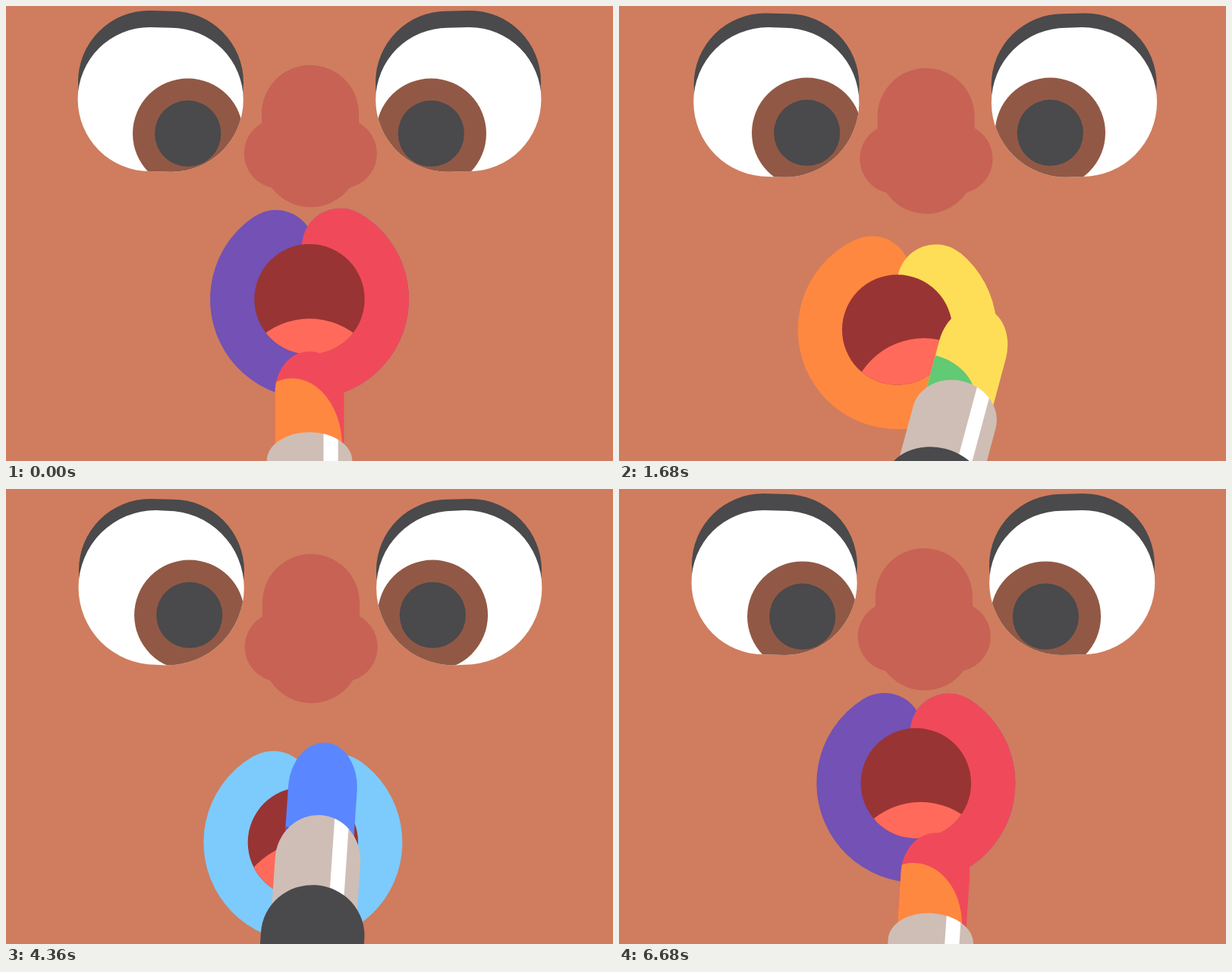
An HTML page with a canvas for the animation above (6720 ms loop, 800x600 px).

```html
<!DOCTYPE html>
<html>
<head>
<meta charset="utf-8">
<title>Rainbow lipstick</title>
<style>
html, body { margin: 0; width: 100%; height: 100%; overflow: hidden; background: #cf7d5e; }
canvas { display: block; }
</style>
</head>
<body>
<canvas id="stage" width="800" height="600"></canvas>
<script>
const ctx = document.getElementById('stage').getContext('2d');
const SKIN = '#cf7d5e', NOSE = '#c76254', DARK = '#4a494c', IRIS = '#915945';
const MOUTH = '#993434', TONGUE = '#ff6a5b', METAL = '#cfbeb6';
const PAINTS = ['#7351b5', '#f04a5a', '#ff8840', '#ffde57', '#62c975', '#7ccbfc', '#5a87ff'];
const TURN = 960, LOOP = TURN * PAINTS.length, TAU = Math.PI * 2, DEG = Math.PI / 180;
const { sin, cos, min, PI } = Math;

function fill(color, path) {
  ctx.fillStyle = color;
  ctx.fill(path);
}

function shape(draw) {
  const path = new Path2D();
  draw(path);
  return path;
}

const circle = (x, y, r) => shape(p => p.arc(x, y, r, 0, TAU));

// Runs a drawing inside its own saved state, optionally clipped.
function layer(draw, clip) {
  ctx.save();
  if (clip) ctx.clip(clip);
  draw();
  ctx.restore();
}

// Slightly tilted pill between two x limits.
const pill = (left, right, y, r) => shape(p => {
  p.arc(left + r, y - 0.4, r, PI / 2, PI * 1.5);
  p.arc(right - r, y + 0.4, r, -PI / 2, PI / 2);
  p.closePath();
});

// Upright column with an elliptic top.
const column = (y, rx, ry) => shape(p => {
  p.ellipse(0, y, rx, ry, 0, PI, TAU);
  p.lineTo(rx, 320);
  p.lineTo(-rx, 320);
  p.closePath();
});

// Pie slice; angles run clockwise from the top.
const slice = (from, to, r) => shape(p => {
  p.moveTo(0, 0);
  p.arc(0, 0, r, from - PI / 2, to - PI / 2);
  p.closePath();
});

function eye(s, c) {
  const dx = -3.64 * s, left = 94.6 + dx, right = 312.8 + dx;
  const r = (197 - 7 * c) / 2;
  const white = pill(left, right, 28.4 + r, r);
  const x = 239.7 - 8 * s, y = 167.2 + c;
  fill(DARK, pill(left + 0.4, right + 0.2, 103.9 - 3.6 * c, 94));
  fill('#fff', white);
  layer(() => fill(IRIS, circle(x, y, 72.7)), white);
  layer(() => fill(DARK, circle(x, y, 43.6)), white);
}

function nose(s, c) {
  const x = 401.3 - 3.64 * s, side = 201.5 - 7 * c;
  const bar = (width, x1, y1, x2, y2) => {
    ctx.lineWidth = width;
    ctx.beginPath();
    ctx.moveTo(x1, y1);
    ctx.lineTo(x2, y2);
    ctx.stroke();
  };
  ctx.strokeStyle = NOSE;
  ctx.lineCap = 'round';
  bar(128, x - 0.3, 146 - 4 * c, x + 0.3, 210 - 8.7 * c);
  bar(92, x - 41.5, side, x + 41.5, side);
}

function lips(s, c, x, y, front, oldColor, newColor) {
  const tilt = (-7.9 * s - 1.06 * c - 0.44) * DEG;
  const spread = 32 * DEG, edge = front - tilt;
  const lobe = side => circle(side * 80 * sin(spread), -80 * cos(spread), 50.8);
  const body = slice(spread, TAU - spread, 131);
  layer(() => {
    ctx.translate(x, y);
    ctx.rotate(tilt);
    for (const part of [body, lobe(-1), lobe(1)]) fill(oldColor, part);
    layer(() => {
      fill(newColor, body);
      fill(newColor, lobe(-1));
    }, slice(0, Math.max(0, min(edge, TAU - 0.001)), 200));
    layer(() => fill(newColor, lobe(1)), slice(-1, min(edge, PI), 200));
  });

  const hole = circle(x, y, 72.7);
  const s2 = 2 * s * c, c2 = c * c - s * s;
  const tx = 400 + 7 * s + 2.4 * s2 + 4.5 * (1 - c2);
  const ty = 537.8 - 27.5 * c + 1.8 * s;
  fill(MOUTH, hole);
  layer(() => fill(TONGUE, circle(tx, ty, 98)), hole);
}

function lipstick(c, stick, age, color, nextColor) {
  layer(() => {
    ctx.translate(stick.x, stick.y);
    ctx.rotate(stick.tilt);

    const bullet = column(stick.tip, 45.4, 57.5 - 3.5 * c);
    fill(color, bullet);
    layer(() => {
      ctx.translate(min(5, 0.085 * age - 23), -19);
      fill(nextColor, column(0, 66, 89.5 + 0.15 * age));
    }, bullet);

    const tube = column(0, 56.3, 49 - 11.5 * c);
    fill(METAL, tube);
    layer(() => {
      ctx.fillStyle = '#fff';
      ctx.fillRect(18.5, -80, 19.2, 400);
    }, tube);
    fill(DARK, column(99, 68.3, 56 - 11 * c));
  });
}

function draw(t) {
  const angle = t / TURN * TAU, s = sin(angle), c = cos(angle);
  const shifted = t + TURN / 2;
  const turn = Math.floor(shifted / TURN);
  const age = shifted % TURN - TURN / 2;
  const paint = i => PAINTS[(turn + i) % PAINTS.length];

  ctx.fillStyle = SKIN;
  ctx.fillRect(0, 0, 800, 600);
  eye(s, c);
  layer(() => {
    ctx.translate(800, 0);
    ctx.scale(-1, 1);
    eye(-s, c);
  });
  nose(s, c);

  const mx = 400 + 33.3 * s, my = 427 - 40.4 * c;
  const stick = {
    x: 400 - 42 * s,
    y: 544 + 55.5 * c + 1.5 * s,
    tilt: -15 * DEG * s,
    tip: -92.5 + 2.5 * c
  };
  // The paint ends behind the bullet, at its angle around the mouth.
  const bx = stick.x - stick.tip * sin(stick.tilt) - mx;
  const by = stick.y + stick.tip * cos(stick.tilt) - my;
  const front = (Math.atan2(bx, -by) + TAU) % TAU;

  lips(s, c, mx, my, front, paint(0), paint(1));
  lipstick(c, stick, age, paint(1), paint(2));
}

const start = performance.now();
function tick() {
  const step = Math.floor((performance.now() - start) / 40 + 0.1);
  draw(step * 40 % LOOP);
  requestAnimationFrame(tick);
}
tick();
</script>
</body>
</html>
```
